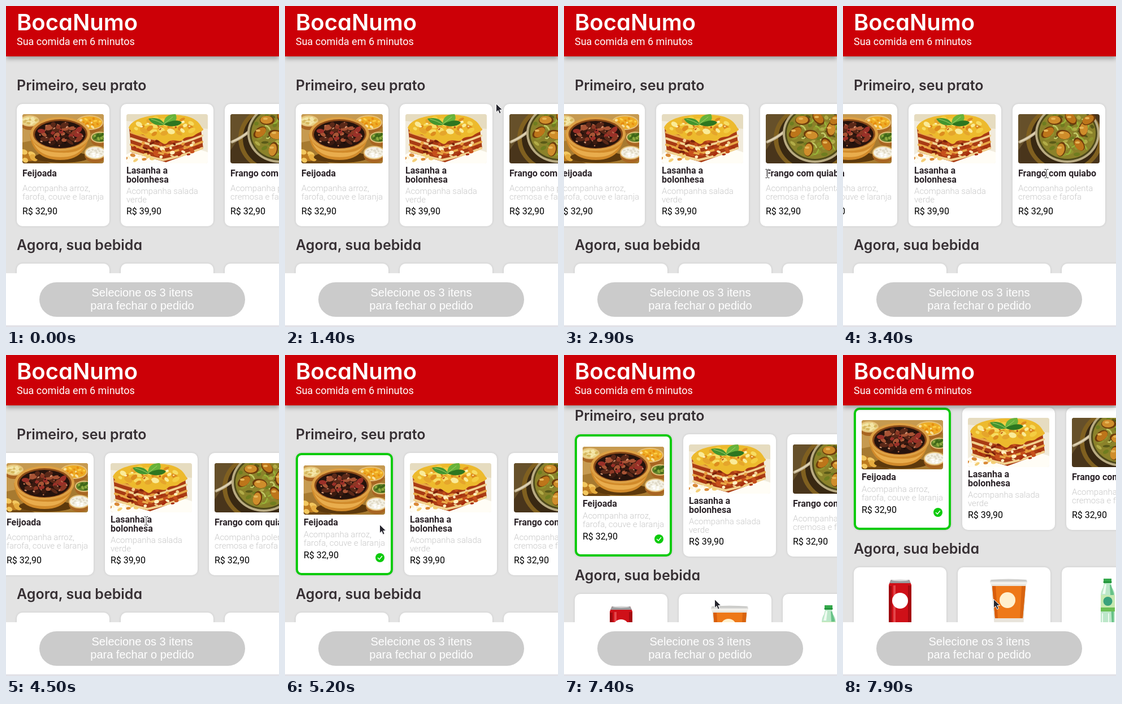
Write an HTML page that moves like this. It is 483 by 567 pixels and loops after 8 s.

```html
<!DOCTYPE html>
<html lang="pt-BR">
<head>
<meta charset="utf-8">
<title>BocaNumo</title>
<style>
html, body { margin: 0; width: 100%; height: 100%; overflow: hidden; background: #e3e3e3; }
body { position: relative; font-family: Roboto, sans-serif; color: #000; }
header { position: absolute; inset: 0 0 auto; height: 89px; background: #cc0007; color: #fff; box-shadow: 0 4px 8px rgba(0,0,0,.32); }
h1, h2 { position: absolute; left: 19px; margin: 0; font-family: Inter, sans-serif; font-weight: 600; font-feature-settings: "cv11"; white-space: nowrap; }
h1 { top: 4px; font-size: 40px; line-height: 50px; }
h2 { font-size: 25px; line-height: 32px; color: #362f33; }
header p { position: absolute; left: 19px; top: 52px; margin: 0; font-size: 18px; line-height: 22px; }
#page, .row { position: absolute; left: 0; top: 0; }
.card { position: absolute; top: 0; box-sizing: border-box; width: 164px; height: 216px; padding: 18px 10px; border-radius: 10px; background: #fff; box-shadow: 0 0 4px rgba(0,0,0,.12); display: flex; flex-direction: column; justify-content: space-between; white-space: nowrap; }
.card svg.photo { display: block; flex: none; width: 144px; height: 87px; border-radius: 4px; }
.card b { font-size: 16px; line-height: 16px; color: #2b2328; }
.card span { font-size: 15px; line-height: 15px; font-weight: 300; color: #c8c8c8; }
.card i { font-style: normal; font-size: 16px; line-height: 16px; }
.tick { position: absolute; right: 11px; bottom: 19px; display: none; }
.on { width: 172px; border: 4px solid #0dcb0d; }
.on i { height: 21px; }
.on .tick { display: block; }
footer { position: absolute; left: 0; right: 0; top: 472px; height: 92px; background: #fff; }
.order { position: absolute; left: 59px; top: 16px; width: 364px; height: 61px; border-radius: 31px; background: #cbcbcb; color: #fff; font: 20px/23px "Liberation Sans", Arial, sans-serif; text-align: center; padding-top: 7px; box-sizing: border-box; }
#edge { position: absolute; left: 0; right: 0; top: 564px; height: 3px; background: #e2e1e7; }
#cursor { position: absolute; left: 0; top: 0; overflow: visible; }
</style>
</head>
<body>
<div id="page">
  <h2 style="top:124px">Primeiro, seu prato</h2>
  <div class="row" id="dishes" style="top:173px"></div>
  <h2 style="top:406px">Agora, sua bebida</h2>
  <div class="row" id="drinks" style="top:455px"></div>
</div>
<header><h1>BocaNumo</h1><p>Sua comida em 6 minutos</p></header>
<footer><div class="order">Selecione os 3 itens<br>para fechar o pedido</div></footer>
<div id="edge"></div>
<svg id="cursor" width="14" height="20">
  <path id="arrow" d="M.5 .5V15.8L4.1 12.5 6.4 18.2 9.2 17 6.9 11.5H11.8Z" fill="#26262e" stroke="#fff"/>
  <g id="beam" fill="none">
    <path d="M-3.5-7.5H-1L0-6.5 1-7.5H3.5M0-6.5V6.5M-3.5 7.5H-1L0 6.5 1 7.5H3.5" stroke="#fff" stroke-width="3"/>
    <path d="M-3.5-7.5H-1L0-6.5 1-7.5H3.5M0-6.5V6.5M-3.5 7.5H-1L0 6.5 1 7.5H3.5" stroke="#222"/>
  </g>
</svg>
<script>
const $ = id => document.getElementById(id);

function seeded(s) {
  return () => (s = (s * 16807) % 2147483647) / 2147483647;
}
const oval = (x, y, rx, ry, fill, more = '') =>
  `<ellipse cx="${x}" cy="${y}" rx="${rx}" ry="${ry}" fill="${fill}" ${more}/>`;
const shape = (d, fill, more = '') => `<path d="${d}" fill="${fill}" ${more}/>`;
const line = (d, color, w) => shape(d, 'none', `stroke="${color}" stroke-width="${w}" stroke-linecap="round"`);

// n small ovals scattered inside an elliptical area
function scatter(seed, n, [x, y, rx, ry], size, colors) {
  const rnd = seeded(seed);
  let out = '';
  for (let i = 0; i < n; i++) {
    const a = i * 2.4, r = Math.sqrt((i + .5) / n);
    const px = x + Math.cos(a) * r * rx, py = y + Math.sin(a) * r * ry;
    const w = size * (.6 + rnd() * .7), h = size * (.4 + rnd() * .4);
    out += oval(px.toFixed(1), py.toFixed(1), w.toFixed(1), h.toFixed(1), colors[Math.floor(rnd() * colors.length)],
      `transform="rotate(${Math.round(rnd() * 90 - 45)} ${px.toFixed(1)} ${py.toFixed(1)})"`);
  }
  return out;
}

function bowl(x, y, rx, ry, fill, seed, colors) {
  return oval(x, y + 4, rx, ry + 2, '#a86522') + oval(x, y, rx, ry, '#e5c07a') +
    oval(x, y, rx - 2, ry - 2, fill) + scatter(seed, 14, [x, y, rx - 5, ry - 4], 3, colors);
}

const stew = () =>
  shape('M0 0H144V87H0Z', '#a77a30') + shape('M0 0H144V22L0 50Z', '#c69a50') + shape('M0 66L50 87H0Z', '#704813') +
  bowl(13, 12, 17, 10, '#e9d487', 7, ['#f4e6a8', '#d6b75e']) +
  bowl(119, 15, 24, 13, '#edab25', 9, ['#ffd045', '#e78d10', '#f8e09a']) +
  bowl(137, 41, 16, 10, '#63832a', 4, ['#8eac3f', '#3f6718']) +
  scatter(18, 9, [8, 74, 13, 9], 7, ['#e5ac3e', '#f2c75f', '#bd7b20']) +
  oval(70, 76, 48, 10, '#5d390c') +
  shape('M13 35C16 65 35 81 67 81S114 65 119 33Z', '#d18a2a') +
  shape('M18 47C26 69 44 76 68 76S105 67 115 48C106 66 89 69 66 68S27 62 18 47Z', '#e9ad4d') +
  oval(67, 35, 53, 30, '#dda044') + oval(67, 35, 48, 26, '#8b4a18') + oval(67, 36, 45, 24, '#26130d') +
  scatter(31, 30, [67, 35, 38, 18], 6.5, ['#8c3824', '#5a2818', '#a85435', '#3a1a10', '#9a3028']) +
  scatter(12, 24, [67, 36, 42, 22], 1.8, ['#bd7450', '#150a08', '#d49773']) +
  bowl(129, 68, 19, 12, '#f4f1e4', 5, ['#fff', '#e0dac8']);

const lasagna = () =>
  shape('M0 0H144V87H0Z', '#f1ebdc') + shape('M0 0H144V26L0 12Z', '#e6dcc0') + oval(76, 78, 80, 20, '#fffdf6') +
  shape('M5 25L60 45 132 27 136 61 70 85 9 68Z', '#a93b14') +
  [34, 45, 56, 67].map((y, i) =>
    line(`M8 ${y - 2}Q36 ${y + 8} 65 ${y + 14}Q100 ${y + 7} 134 ${y - 7}`, i % 2 ? '#f2d290' : '#e8a846', 4)).join('') +
  scatter(41, 42, [72, 60, 60, 16], 4, ['#a92d0d', '#c7501c', '#f1cf90', '#7c220c', '#e79a3c', '#fff0c0']) +
  shape('M4 24C10 7 43 1 67 1S122 0 133 23C140 31 126 32 121 37S105 38 100 45 80 41 73 50 57 42 47 44 34 34 25 36 10 34 4 24Z', '#edba2d') +
  scatter(55, 32, [69, 22, 55, 15], 6, ['#f7dc62', '#f4cd42', '#dd8c1e', '#faeb98', '#e5a52b']) +
  scatter(23, 10, [70, 18, 48, 11], 2.5, ['#bd531b', '#fff4bb']) +
  scatter(14, 11, [22, 77, 28, 6], 4, ['#f4ce75', '#fff5d5', '#d98936']) +
  shape('M67 19C51 22 43 15 39 8 53 5 62 8 67 17Z', '#43952f') + shape('M66 18C66 5 74 0 87 0 93 12 82 18 66 18Z', '#67b33b') +
  shape('M66 18C76 12 92 8 98 15 91 23 76 23 66 18Z', '#2d7620') + line('M44 9Q57 12 66 18L82 5', '#a4cf68', 1);

const chicken = () =>
  shape('M0 0H144V87H0Z', '#49351b') + shape('M0 0H45L0 64Z', '#66502a') +
  oval(82, 43, 68, 60, '#806020') + oval(82, 43, 60, 54, '#382812') +
  line('M3 49Q20 42 35 29', '#c3b596', 5) + line('M4 48Q19 42 31 32', '#f0e3c2', 1.5) +
  oval(87, 34, 57, 52, '#b9ab83') + oval(87, 34, 53, 48, '#4f4a1b') + oval(87, 34, 50, 45, '#8b822a') +
  scatter(8, 48, [87, 34, 46, 41], 5, ['#91952e', '#6f7d20', '#b2ac48', '#5a5a18']) +
  [...Array(20)].map((_, i) => {
    const x = 87 + Math.cos(i * 2.4) * (12 + i * 1.4), y = 34 + Math.sin(i * 2.4) * (10 + i * 1.4);
    return line(`M${x.toFixed(1)} ${y.toFixed(1)}q5 ${i % 5 - 2} 8 ${i % 2 ? -8 : 7}`, i % 3 ? '#98b339' : '#c2c866', 2.5);
  }).join('') +
  [[65, 11], [93, 8], [115, 27], [52, 32], [80, 36], [108, 53], [76, 62], [125, 10]].map(([x, y], i) =>
    oval(x, y, 13, 8, '#6d3b0b', `transform="rotate(${i * 47} ${x} ${y})"`) +
    oval(x - 1, y - 1, 11, 7, i % 2 ? '#bd751a' : '#cf8d2b', `transform="rotate(${i * 47} ${x} ${y})"`) +
    oval(x - 3, y - 3, 4, 2, '#e6b657')).join('');

const can = () =>
  shape('M56 4H88L92 13V83L87 87H57L52 83V13Z', '#cf1018') + shape('M56 4H88L91 10H53Z', '#9c9c9e') +
  oval(72, 5, 15, 1.5, '#d9d9d9') + shape('M52 15H57V85L52 82Z', '#9d0910') + shape('M86 14H92V82L86 85Z', '#a60910') +
  shape('M60 14H64V85H60Z', '#e4464a') + oval(72, 41, 14, 14, '#fff');

const cup = () =>
  shape('M49 10H111L106 87H55Z', '#e8e4dc') + shape('M51 15H110L105 72H56Z', '#ee7818') +
  shape('M51 15H57L61 72H56Z', '#d95d0b') + shape('M103 15H110L105 72H100Z', '#d86410') +
  shape('M48 4Q80 1 112 4L113 9H47Z', '#d7d7d5') + shape('M47 8H113L112 12H48Z', '#f3f1ec') + line('M50 5H110', '#b9b9b6', 1) +
  oval(78, 40, 14, 14, '#fff0ce');

const bottle = () =>
  shape('M65 10H77L79 18Q84 24 84 33V87H59V33Q59 24 63 18Z', '#bce7c9') + shape('M64 2H78V10H64Z', '#35a94c') +
  line('M64 8H78', '#1a8835', 1.5) + shape('M66 12H69L67 29H62Z', '#effbf1') + shape('M75 13H77L82 28V87H79Z', '#67c287') +
  shape('M59 31H84V57H59Z', '#c6e9b0') + shape('M59 53H84V60H59Z', '#6cbf55') +
  oval(71.5, 42, 8, 8, '#39a17c') + line('M62 64V86M73 64V86', '#eefaf0', 2);

const tick = `<svg class="tick" width="16" height="16">${oval(8, 8, 8, 8, '#0dcb0d')}${line('M4.5 8.5L7 11 11.5 5.5', '#fff', 1.5)}</svg>`;

function fill(row, items) {
  row.innerHTML = items.map(([photo, name, about, price]) =>
    `<div class="card"><svg class="photo" viewBox="0 0 144 87">${photo()}</svg>` +
    `<b>${name}</b><span>${about}</span><i>${price}</i>${tick}</div>`).join('');
}
fill($('dishes'), [
  [stew, 'Feijoada', 'Acompanha arroz,<br>farofa, couve e laranja', 'R$ 32,90'],
  [lasagna, 'Lasanha a<br>bolonhesa', 'Acompanha salada<br>verde', 'R$ 39,90'],
  [chicken, 'Frango com quiabo', 'Acompanha polenta<br>cremosa e farofa', 'R$ 32,90']
]);
fill($('drinks'), [[can, '', '', ''], [cup, '', '', ''], [bottle, '', '', '']]);
const place = (row, shift) => [...row.children].forEach((c, i) => {
  c.style.left = 19 + i * 184 + (i ? shift : 0) + 'px';
});
place($('drinks'), 0);

// Each move: first step, last step, then the values reached
const LOOP = 8000, STEP = 100;
const pointer = [
  [600, 600, 470, 258], [700, 700, 395, 214], [800, 800, 363, 192], [900, 900, 368, 211],
  [1100, 1200, 368, 163], [1400, 1400, 373, 172], [1700, 1700, 374, 183], [2000, 2100, 360, 272],
  [2400, 2600, 360, 296], [4000, 4500, 248, 293], [4800, 5100, 167, 299],
  [5700, 6000, 211, 367], [6300, 7000, 266, 431]
];
const sideways = [[2400, 2600, -33], [2900, 2900, -40], [3000, 3400, -87], [4000, 4400, -55], [4500, 4500, -28], [4600, 4600, 0]];
const down = [[7300, 7300, -8], [7400, 7400, -33], [7500, 7500, -46], [7600, 7600, -51], [7700, 7700, -53], [7900, 7900, -80]];

function valueAt(moves, t, start) {
  let now = start;
  for (const [from, to, ...goal] of moves) {
    if (t < from) break;
    const p = Math.min(1, (t - from + STEP) / (to - from + STEP));
    now = now.map((v, i) => Math.round(v + (goal[i] - v) * p));
  }
  return now;
}

function draw(ms) {
  const t = Math.floor((ms % LOOP) / STEP) * STEP;
  const [x, y] = valueAt(pointer, t, [483, 266]);
  const picked = t >= 5200, typing = t >= 2600 && t < 4900;
  $('page').style.transform = `translateY(${valueAt(down, t, [0])}px)`;
  $('dishes').style.transform = `translateX(${valueAt(sideways, t, [0])}px)`;
  $('dishes').firstChild.classList.toggle('on', picked);
  place($('dishes'), picked ? 8 : 0);
  $('cursor').style.display = t < 600 ? 'none' : 'block';
  $('cursor').style.transform = `translate(${x}px,${y}px)`;
  $('arrow').style.display = typing ? 'none' : '';
  $('beam').style.display = typing ? '' : 'none';
}

const began = performance.now();
(function tickLoop() {
  draw(Math.max(0, performance.now() - began));
  requestAnimationFrame(tickLoop);
})();
</script>
</body>
</html>
```
